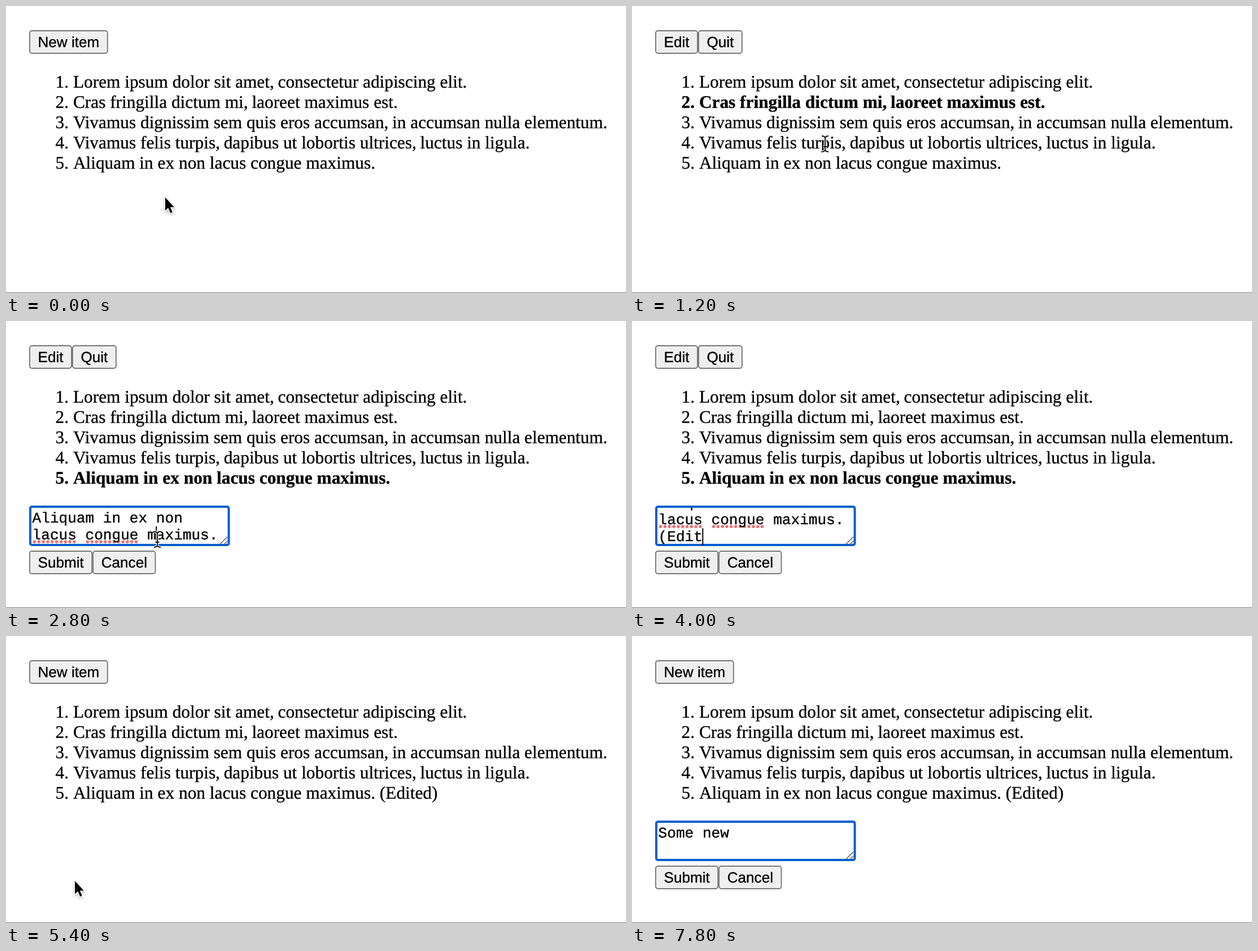
These frames come from a looping animation (1098 by 510 pixels, 8000 ms). An HTML page with a canvas:

```html
<!DOCTYPE html>
<html lang="en">
<head>
<meta charset="utf-8">
<title>Editable list</title>
<style>
  html, body { margin: 0; width: 100%; height: 100%; overflow: hidden; background: #fff; }
  canvas { display: block; }
</style>
</head>
<body>
<canvas id="stage" width="1098" height="510"></canvas>
<script>
const ctx = document.getElementById('stage').getContext('2d');
const LOOP = 8000, STEP = 200;

const SERIF = '31.33px "Liberation Serif", Times, serif';
const SANS = '26.1px "Liberation Sans", Arial, sans-serif';
const MONO = '26.1px "Liberation Mono", Courier, monospace';
const COL = 15.66, LINE = 30.4, TEXT_X = 46.6;
const COMMA_KERN = -1.1;

const items = [
  'Lorem ipsum dolor sit amet, consectetur adipiscing elit.',
  'Cras fringilla dictum mi, laoreet maximus est.',
  'Vivamus dignissim sem quis eros accumsan, in accumsan nulla elementum.',
  'Vivamus felis turpis, dapibus ut lobortis ultrices, luctus in ligula.',
  'Aliquam in ex non lacus congue maximus.'
];
const draft = ['Aliquam in ex non', 'lacus congue maximus.'];

// Pointer path: time, x, y, shape until the next key
const path = [
  [0, 282, 340, 'arrow'], [200, 312, 232, 'beam'], [400, 340, 124, 'beam'],
  [600, 345, 136, 'beam'], [800, 350, 172, 'beam'], [1000, 348, 190, 'beam'],
  [1200, 342, 245, 'beam'], [1400, 341, 247, 'beam'], [1800, 316, 280, 'beam'],
  [2000, 200, 172, 'beam'], [2200, 80, 62, 'arrow'], [2400, 81, 64, 'arrow'],
  [2600, 84, 88, 'arrow'], [2800, 268, 388, 'beam'], [3200, 382, 388, 'beam'],
  [3400, 382, 388, ''], [5000, 115, 424, 'arrow'], [5400, 122, 435, 'arrow'],
  [6000, 121, 428, 'arrow'], [6200, 118, 330, 'arrow'], [6600, 108, 64, 'arrow'],
  [7000, 108, 64, 'arrow'], [7200, 108, 64, '']
];

// Selected row (1-based, 0 for none) from each time on
const selection = [[0, 0], [400, 1], [800, 2], [1400, 4], [1800, 5], [5200, 0]];

// Text area from each time on: lines, caret [line, column] or null, scroll
const editor = [
  [0, null],
  [2400, { lines: draft, caret: null, scroll: 0 }],
  [2800, { lines: draft, caret: [1, 14], scroll: 0 }],
  [3200, { lines: draft, caret: [1, 21], scroll: 0 }],
  [3600, { lines: draft, caret: [1, 22], scroll: 27 }],
  [3800, typed('(')],
  [4000, typed('(Edit')],
  [4200, typed('(Edited')],
  [4400, typed('(Edited)')],
  [4800, typed('(Edited)', false)],
  [5200, null],
  [7000, { lines: [''], caret: [0, 0], scroll: 0 }],
  [7400, { lines: ['Some'], caret: [0, 4], scroll: 0 }],
  [7600, { lines: ['Some new '], caret: [0, 9], scroll: 0 }],
  [7800, { lines: ['Some new '], caret: null, scroll: 0 }]
];

function typed(text, showCaret = true) {
  return { lines: [...draft, text], caret: showCaret ? [2, text.length] : null, scroll: 27 };
}

function keyIndex(keys, t) {
  let i = keys.length - 1;
  while (keys[i][0] > t) i--;
  return i;
}

function valueAt(keys, t) {
  return keys[keyIndex(keys, t)][1];
}

function pointerAt(t) {
  const i = keyIndex(path, t);
  const [t0, x0, y0, shape] = path[i];
  const [t1, x1, y1] = path[i + 1] || [LOOP, x0, y0];
  const k = (t - t0) / (t1 - t0);
  return { x: x0 + (x1 - x0) * k, y: y0 + (y1 - y0) * k, shape };
}

// A hairline stroke gives the slightly heavier smoothed type
function text(str, x, y, font) {
  ctx.font = font;
  ctx.fillStyle = ctx.strokeStyle = '#000';
  ctx.lineWidth = 0.35;
  ctx.fillText(str, x, y);
  ctx.strokeText(str, x, y);
}

function kernedText(str, x, y, font) {
  for (const part of str.split(/(?<=, )/)) {
    text(part, x, y, font);
    x += ctx.measureText(part).width + COMMA_KERN;
  }
}

function box(x, y, w, h, r, line, stroke, fill) {
  ctx.beginPath();
  ctx.roundRect(x + line / 2, y + line / 2, w - line, h - line, r);
  ctx.fillStyle = fill;
  ctx.fill();
  ctx.lineWidth = line;
  ctx.strokeStyle = stroke;
  ctx.stroke();
}

function buttons(labels, y, pointer) {
  let x = 41;
  for (const label of labels) {
    ctx.font = SANS;
    const w = ctx.measureText(label).width + 31;
    const hover = pointer.shape === 'arrow' && pointer.x > x && pointer.x < x + w &&
      pointer.y > y && pointer.y < y + 42;
    box(x, y, w, 42, 4, 1.9, hover ? '#4f4f4f' : '#767676', hover ? '#e5e5e5' : '#efefef');
    text(label, x + 15.5, y + 29.5, SANS);
    x += w;
  }
}

function list(t) {
  const selected = valueAt(selection, t);
  items.forEach((item, i) => {
    const font = (selected === i + 1 ? 'bold ' : '') + SERIF;
    const y = 144.6 + 36.2 * i;
    const suffix = i === 4 && t >= 5200 ? ' (Edited)' : '';
    text(i + 1 + '.', 87.6, y, font);
    kernedText(item + suffix, 118.9, y, font);
  });
}

function misspelling(col, length, y) {
  ctx.fillStyle = '#f26a6d';
  for (let i = 0; i < length * 2; i++) {
    ctx.beginPath();
    ctx.arc(TEXT_X + col * COL + (i + 0.5) * COL / 2, y + 4.4, 2.7, 0, 7);
    ctx.fill();
  }
}

function textArea({ lines, caret, scroll }) {
  const baseline = i => 357.5 + i * LINE - scroll;
  box(41, 328, 355.5, 72, 3, 4, '#005fcc', '#fff');
  ctx.save();
  ctx.beginPath();
  ctx.rect(45, 332, 347.5, 66);
  ctx.clip();
  lines.forEach((line, i) => {
    if (line === draft[1]) {
      misspelling(0, 5, baseline(i));
      misspelling(6, 6, baseline(i));
    }
    text(line, TEXT_X, baseline(i), MONO);
  });
  if (caret) ctx.fillRect(TEXT_X + caret[1] * COL - 0.6, baseline(caret[0]) - 23, 2, 30);
  ctx.restore();

  ctx.strokeStyle = '#555';
  ctx.lineWidth = 1.4;
  ctx.beginPath();
  ctx.moveTo(378.5, 397);
  ctx.lineTo(392, 383.5);
  ctx.moveTo(386, 397);
  ctx.lineTo(392, 391);
  ctx.stroke();
}

const arrow = new Path2D('M0 0V23.6L5.2 18.8L9.2 28L12.8 26.4L8.8 17.4H15.8Z');
const beam = new Path2D(
  'M-6 -14Q-1 -14 0 -10.5Q1 -14 6 -14M0 -10.5V10.5M-6 14Q-1 14 0 10.5Q1 14 6 14M-3.5 5H3.5');

function drawPointer({ x, y, shape }) {
  if (!shape) return;
  ctx.save();
  ctx.translate(x, y);
  ctx.lineJoin = 'round';
  ctx.strokeStyle = '#fff';
  if (shape === 'arrow') {
    ctx.shadowColor = 'rgba(0,0,0,.3)';
    ctx.shadowBlur = 4;
    ctx.shadowOffsetY = 2;
    ctx.lineWidth = 3.2;
    ctx.stroke(arrow);
    ctx.shadowColor = 'transparent';
    ctx.fillStyle = '#000';
    ctx.fill(arrow);
  } else {
    ctx.lineWidth = 4.4;
    ctx.stroke(beam);
    ctx.strokeStyle = '#111';
    ctx.lineWidth = 1.9;
    ctx.stroke(beam);
  }
  ctx.restore();
}

function draw(t) {
  const pointer = pointerAt(t);
  const area = valueAt(editor, t);
  ctx.textRendering = 'geometricPrecision';
  ctx.fillStyle = '#fff';
  ctx.fillRect(0, 0, 1098, 510);
  buttons(t >= 400 && t < 5200 ? ['Edit', 'Quit'] : ['New item'], 43, pointer);
  list(t);
  if (area) {
    textArea(area);
    buttons(['Submit', 'Cancel'], 408, pointer);
  }
  ctx.fillStyle = '#767676';
  ctx.fillRect(0, 509, 1098, 1);
  drawPointer(pointer);
}

const start = performance.now();
function tick() {
  const t = (performance.now() - start) % LOOP;
  draw(Math.floor(t / STEP) * STEP);
  requestAnimationFrame(tick);
}
tick();
</script>
</body>
</html>
```
